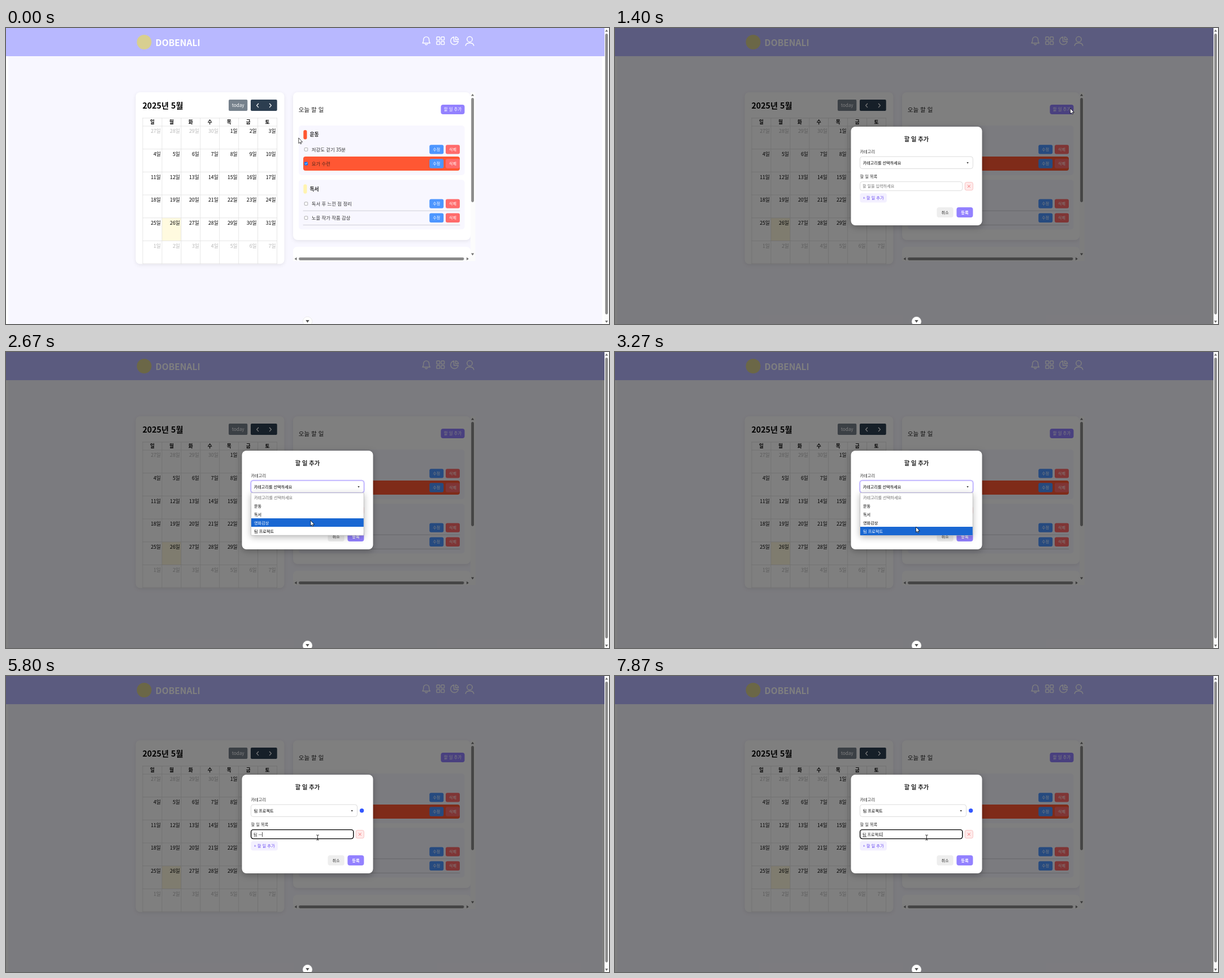
An HTML page for the animation above (8000 ms loop, 1067 by 525 pixels).

```html
<!DOCTYPE html>
<html lang="ko">
<head>
<meta charset="utf-8">
<title>Planner</title>
<style>
  html, body { margin: 0; width: 100%; height: 100%; overflow: hidden; background: #fff; }
  svg { display: block; width: 100%; height: 100%; }
  text { font-family: "Noto Sans CJK KR", "Noto Sans CJK", "Noto Sans", sans-serif; white-space: pre; }
  .card { filter: drop-shadow(0 2px 3px rgba(0, 0, 0, .08)); }
  .pop { filter: drop-shadow(0 3px 6px rgba(0, 0, 0, .28)); }
</style>
</head>
<body>
<svg id="stage" viewBox="0 0 1067 525" preserveAspectRatio="xMinYMin meet"></svg>
<script>
const LOOP = 8000, TICK = 200 / 3;
const PURPLE = '#9381ff', NAVY = '#2c3e50', PALE = '#f8f7ff', GRAY = '#8b8b8b';

const rect = (x, y, w, h, fill, r = 0, extra = '') =>
  `<rect x="${x}" y="${y}" width="${w}" height="${h}" rx="${r}" fill="${fill}" ${extra}/>`;
const text = (x, y, size, str, fill = '#000', weight = 400, anchor = 'start', extra = '') =>
  `<text x="${x}" y="${y}" font-size="${size}" fill="${fill}" font-weight="${weight}" text-anchor="${anchor}" ${extra}>${str}</text>`;
const path = (d, fill, stroke = 'none', width = 1) =>
  `<path d="${d}" fill="${fill}" stroke="${stroke}" stroke-width="${width}" stroke-linecap="round" stroke-linejoin="round"/>`;
const group = (id, body, extra = '') => `<g id="${id}" ${extra}>${body}</g>`;
const border = (color, width = .6) => `stroke="${color}" stroke-width="${width}"`;
const button = (x, y, w, h, fill, label, size = 7.1, color = '#fff', weight = 500, r = 3) =>
  rect(x, y, w, h, fill, r) + text(x + w / 2, y + h / 2 + size * .36, size, label, color, weight, 'middle');

// Triangle pointing along (dx, dy)
const tri = (x, y, dx, dy, s = 2.6, fill = '#707070') => {
  const px = x - dx * s * .7, py = y - dy * s * .7;
  return path(`M${x + dx * s * .8} ${y + dy * s * .8}L${px - dy * s} ${py + dx * s}L${px + dy * s} ${py - dx * s}Z`, fill);
};

function header() {
  const cells = [[762, 15.8], [770, 15.8], [762, 23.8], [770, 23.8]]
    .map(([x, y]) => rect(x, y, 5.6, 5.6, 'none', 1.2, border('#fff', 1.4))).join('');
  return rect(0, 0, 1059, 50, '#b8b8ff') +
    '<circle cx="244.5" cy="25" r="13" fill="#d8cf90"/>' +
    text(264.5, 31.8, 15.6, 'DOBENALI', '#fff', 700) +
    path('M737 26.8C739 25 738.8 23 738.8 20.5A4.9 4.9 0 0 1 748.6 20.5C748.6 23 748.4 25 750.4 26.8ZM741.8 28.8Q743.7 30.8 745.6 28.8', 'none', '#fff', 1.4) +
    cells +
    path('M792.6 16A6.8 6.8 0 1 0 800.3 23.7H792.6ZM795.6 15.6A6.8 6.8 0 0 1 800.7 20.7H795.6Z', 'none', '#fff', 1.4) +
    '<circle cx="820.5" cy="20" r="4.7" fill="none" stroke="#fff" stroke-width="1.5"/>' +
    path('M813.2 31.2C814.5 24.8 826.5 24.8 827.8 31.2', 'none', '#fff', 1.5);
}

function calendar() {
  const x0 = 242, y0 = 174, cw = 33.93, rh = 40.7;
  let out = rect(229.5, 114, 263, 304.5, '#fff', 8, 'class="card"') +
    text(241.5, 142.8, 14.2, '2025년 5월', '#000', 700) +
    button(394, 127, 33.3, 20, '#76818c', 'today', 8.2, '#fff', 400, 2) +
    rect(433, 127, 46.7, 20, NAVY, 2) +
    path('M446.6 134.2L443.6 137.4L446.6 140.6M466.4 134.2L469.4 137.4L466.4 140.6', 'none', '#fff', 1.3) +
    rect(x0 + cw, y0 + rh * 4, cw, rh, '#fffadf');
  let grid = `M${x0} 159.8H479.5M${x0} 418H479.5`;
  for (let c = 0; c <= 7; c++) grid += `M${x0 + c * cw} 159.8V418`;
  for (let r = 0; r < 6; r++) grid += `M${x0} ${y0 + r * rh}H479.5`;
  out += path(grid, 'none', '#ddd', .7);
  [...'일월화수목금토'].forEach((d, c) => {
    out += text(x0 + (c + .5) * cw, 170, 8.6, d, '#000', 700, 'middle');
  });
  for (let i = 0; i < 42; i++) {
    const n = i - 3, day = n < 1 ? n + 30 : n > 31 ? n - 31 : n;
    out += text(x0 + (i % 7 + 1) * cw - 2, y0 + Math.floor(i / 7) * rh + 12.2, 8.75,
      day + '일', n === day ? '#000' : '#b8b8b8', 400, 'end');
  }
  return out;
}

function task(y, label, done) {
  const box = done
    ? rect(528, y - 3, 6, 6, '#0075ff', 1) + path(`M529.4 ${y}l1.2 1.3 2.2-2.7`, 'none', '#fff', .9)
    : rect(528.2, y - 2.8, 5.6, 5.6, '#fff', 1, border('#767676'));
  return (done ? rect(526, y - 12.4, 277, 24.8, '#ff5733', 4) : '') + box +
    text(540.8, y + 3.3, 8.4, label, done ? '#54291d' : '#333') +
    button(749.3, y - 8.2, 25, 16.4, '#4d96ff', '수정') +
    button(778, y - 8.2, 25, 16.4, '#ff6b6b', '삭제');
}

const category = (y, color, name) =>
  rect(518, y, 293.5, 88, PALE, 5) + rect(526.3, y + 8, 6.2, 16.5, color, 3) +
  text(537.4, y + 19.3, 8.8, name, '#222', 700);

function todos() {
  return rect(508, 114, 314, 262, '#fff', 8, 'class="card"') +
    path('M508 405V396Q508 388 516 388H814Q822 388 822 396V405Z', '#fff') +
    text(517.8, 149, 10.5, '오늘 할 일', '#222', 500) +
    button(769.5, 136, 42, 17, PURPLE, '할 일 추가', 7.45, '#fff', 500, 4) +
    category(173, '#ff5733', '운동') +
    task(215.4, '저강도 걷기 35분') + task(240.5, '요가 수련', true) +
    category(269.3, '#fff3b0', '독서') +
    task(311.6, '독서 후 느낀 점 정리') + task(336.7, '노을 작가 작품 감상') +
    path('M526 324.2H803M526 349.4H803', 'none', '#c6c6cc', .8) +
    rect(822, 114, 8.5, 291, '#fcfcfc') + rect(508, 405, 322.5, 8.5, '#fcfcfc') +
    rect(823.2, 124, 4.8, 185, GRAY, 2.4) + rect(518, 407, 292.5, 4.9, GRAY, 2.4) +
    tri(825.6, 118.8, 0, -1) + tri(825.6, 401.4, 0, 1) +
    tri(512.6, 409.4, -1, 0) + tri(816.8, 409.4, 1, 0);
}

const options = ['카테고리를 선택하세요', '운동', '독서', '영화감상', '팀 프로젝트'];

function dropdown() {
  return rect(433.6, 249.8, 199.6, 75.4, '#fff', 1, `class="pop" ${border('#aaa')}`) +
    rect(434, 250, 198.8, 15, '#1967d2', 0, 'id="hover"') +
    options.map((o, i) => text(439, 260.7 + i * 15, 7.2, o, i ? '#000' : '#6d6d6d', 400, 'start', 'class="option"')).join('');
}

function modal() {
  return rect(417.5, 175, 232, 175, '#fff', 8, 'class="pop"') +
    text(533.5, 200.6, 10.3, '할 일 추가', '#222', 700, 'middle') +
    text(433.4, 221.6, 7.3, '카테고리', '#333') +
    rect(432.6, 227.2, 201.6, 23.2, 'none', 4.6, `id="ring" ${border('rgba(147,129,255,.3)', 1.6)}`) +
    rect(433.5, 228.1, 199.8, 21.4, '#fff', 4, 'id="select"') +
    text(438.7, 241.6, 7.15, '', '#000', 400, 'start', 'id="choice"') +
    group('chevron', tri(0, 0, 0, 1, 1.7, '#333')) +
    '<circle id="dot" cx="629.6" cy="238.8" r="3.7" fill="#3357ff"/>' +
    text(433.4, 266.3, 7.3, '할 일 목록', '#333') +
    rect(433.6, 272.6, 181.2, 16, '#fff', 4, 'id="input"') +
    text(438, 283, 7.1, '', '#000', 400, 'start', 'id="typed"') +
    rect(438, 285.3, 7.5, .6, '#222', 0, 'id="underline"') +
    rect(0, 277, .7, 8.3, '#000', 0, 'id="caret"') +
    rect(619.2, 273.6, 14.2, 14.2, '#ffeaea', 3, border('#f3a3a3')) +
    path('M624.2 278.6L628.4 282.8M628.4 278.6L624.2 282.8', 'none', '#f05a5a', .8) +
    button(433.4, 293, 47.6, 16.6, '#f3f0ff', '+ 할 일 추가', 7.3, '#6a4df0', 500, 4) +
    button(569.5, 318, 29.2, 18, '#eee', '취소', 7.3, '#333', 400, 4) +
    button(604.4, 318, 29, 18, PURPLE, '등록', 7.3, '#fff', 700, 4) +
    group('menu', dropdown());
}

const stage = document.getElementById('stage');
stage.innerHTML =
  rect(0, 0, 1067, 525, '#fff') + rect(4, 50, 1051, 475, PALE) +
  header() + calendar() + todos() +
  group('dialog', rect(0, 0, 1059, 525, 'rgba(0,0,0,.5)') + modal()) +
  '<circle cx="533.5" cy="520.5" r="8.3" fill="#fff" stroke="#ddd" stroke-width=".6"/>' +
  tri(533.5, 520.2, 0, 1, 3.2, '#555') +
  rect(1059, 0, 8, 525, '#fcfcfc') + rect(1060.3, 10, 4.8, 498, GRAY, 2.4) +
  tri(1062.7, 4.8, 0, -1) + tri(1062.7, 520.8, 0, 1) +
  group('arrow', path('M0 0V9.3L2.1 7.4L3.5 10.5L4.9 9.9L3.5 6.9H6.4Z', '#fff', '#000', .7)) +
  group('beam', path('M-2-4.4H-.6L0-4L.6-4.4H2M0-4V4M-2 4.4H-.6L0 4L.6 4.4H2', 'none', '#000', .8));

const el = {};
stage.querySelectorAll('[id]').forEach(node => { el[node.id] = node; });
const optionText = stage.querySelectorAll('.option');
const set = (node, attrs) => { for (const k in attrs) node.setAttribute(k, attrs[k]); };
const show = (node, on) => set(node, { display: on ? 'inline' : 'none' });

// Pointer stops: time, x, y
const stops = [
  [0, 517.8, 195.3], [66, 519, 195.5], [267, 519, 195.5], [1000, 805.6, 142.8],
  [1533, 805.6, 142.8], [2133, 545, 240], [2266, 545, 240], [2400, 542, 256],
  [2666, 539, 299], [3000, 533, 316], [3133, 533, 311.5], [3200, 533, 311.5],
  [3266, 532.5, 310.5], [3466, 532.5, 310.5], [3930, 544.5, 287.5],
  [4266, 544.5, 287.5], [4333, 551.5, 286.5]
];

// Key presses while composing Hangul
const keys = [
  [4130, ''], [4800, 'ㅌ'], [5000, '티'], [5270, '팀'], [5600, '팀 '], [5800, '팀 ㅡ'],
  [6400, '팀 '], [6800, '팀 ㅍ'], [6930, '팀 프'], [7000, '팀 플'], [7130, '팀 프로'],
  [7270, '팀 프롲'], [7330, '팀 프로제'], [7470, '팀 프로젝'], [7730, '팀 프로젝ㅌ'], [7870, '팀 프로젝트']
];

function pointerAt(t) {
  const i = stops.findIndex(s => s[0] > t);
  if (i < 0) return stops[stops.length - 1].slice(1);
  const [t0, x0, y0] = stops[i - 1], [t1, x1, y1] = stops[i];
  const u = (t - t0) / (t1 - t0), e = u * u * (3 - 2 * u);
  return [x0 + (x1 - x0) * e, y0 + (y1 - y0) * e];
}

function render(t) {
  const [x, y] = pointerAt(Math.floor(t / TICK + .01) * TICK);
  const chosen = t >= 3530, typing = t >= 4130;
  const onInput = chosen && y > 272 && y < 290;
  for (const node of [el.arrow, el.beam]) set(node, { transform: `translate(${x} ${y})` });
  show(el.arrow, !onInput);
  show(el.beam, onInput);
  show(el.dialog, t >= 1398);

  const open = t >= 2264 && !chosen, focused = t >= 2264 && !typing;
  const width = chosen ? 188 : 199.8;
  show(el.menu, open);
  const row = Math.max(0, Math.min(4, Math.floor((y - 250) / 15)));
  show(el.hover, row > 0);
  set(el.hover, { y: 250 + row * 15 });
  optionText.forEach((node, i) => set(node, { fill: !i ? '#6d6d6d' : i === row ? '#fff' : '#000' }));

  show(el.ring, focused);
  set(el.ring, { width: width + 1.8 });
  set(el.select, { width, stroke: focused ? PURPLE : '#c4c4c4', 'stroke-width': focused ? .8 : .6 });
  set(el.chevron, { transform: `translate(${433.5 + width - 9.3} 239.3)` });
  el.choice.textContent = options[chosen ? 4 : 0];
  show(el.dot, chosen);

  const [since, value] = keys.filter(k => k[0] <= t).pop() || [0, ''];
  set(el.input, { stroke: typing ? '#000' : '#c4c4c4', 'stroke-width': typing ? 1.4 : .6 });
  el.typed.textContent = value || '할 일을 입력하세요';
  set(el.typed, { fill: value ? '#222' : '#757575', y: value ? 283.5 : 283 });
  show(el.caret, typing && (t - since) % 1060 < 530);
  set(el.caret, { x: 438 + (value ? el.typed.getComputedTextLength() : 0) });
  show(el.underline, t >= 6800 || (t >= 4800 && t < 5600));
}

const start = performance.now();
function loop() {
  render((performance.now() - start) % LOOP);
  requestAnimationFrame(loop);
}
loop();
</script>
</body>
</html>
```
